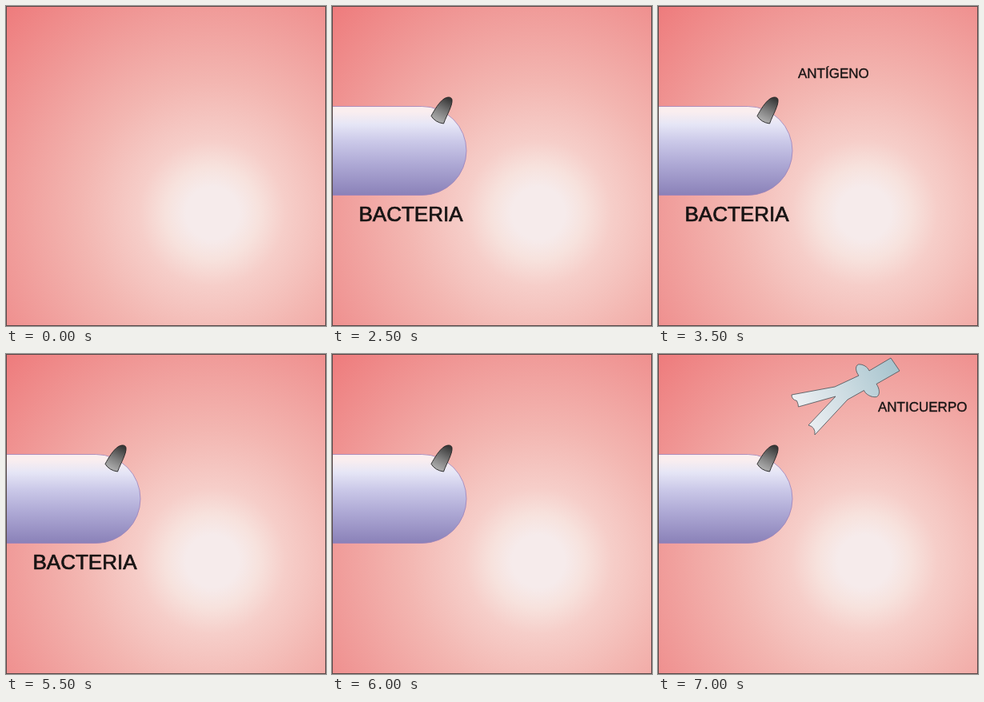
Animation, 400 px wide and 400 px high, one loop 8000 ms. Source, as an HTML page:

```html
<!DOCTYPE html>
<html lang="es">
<head>
<meta charset="utf-8">
<title>Bacteria, antígeno y anticuerpo</title>
<style>
  html, body { margin: 0; width: 100%; height: 100%; overflow: hidden; }
  svg { display: block; width: 100vw; height: 100vh; }
  text {
    font: 17px "Liberation Sans", Arial, sans-serif;
    fill: #181414; stroke: #181414; stroke-width: .35;
  }
  .big { font-size: 26px; stroke-width: .7; }

  /* every part appears and disappears with a hard cut */
  .part { opacity: 0; animation: 8s step-end infinite; }
  #bacteria { animation-name: bacteria; }
  #bacteria-label { animation-name: bacteria-label; }
  #antigen-label { animation-name: antigen-label; }
  #arrow { animation-name: arrow; }
  #antibody { animation-name: antibody; }
  #antibody-label { animation-name: antibody-label; }

  @keyframes bacteria { 0% { opacity: 0 } 18.75%, 100% { opacity: 1 } }
  @keyframes bacteria-label { 0%, 75%, 100% { opacity: 0 } 31.25% { opacity: 1 } }
  @keyframes antigen-label { 0%, 68.75%, 100% { opacity: 0 } 43.75% { opacity: 1 } }
  @keyframes arrow { 0%, 68.75%, 100% { opacity: 0 } 50% { opacity: 1 } }
  @keyframes antibody { 0% { opacity: 0 } 81.25%, 100% { opacity: 1 } }
  @keyframes antibody-label { 0% { opacity: 0 } 87.5%, 100% { opacity: 1 } }
</style>
</head>
<body>
<svg viewBox="0 0 400 400">
  <defs>
    <radialGradient id="tissue" gradientUnits="userSpaceOnUse" cx="258" cy="259" r="365">
      <stop offset=".09" stop-color="#f6ebeb"/>
      <stop offset=".16" stop-color="#f7e2dd"/>
      <stop offset=".25" stop-color="#f6cec9"/>
      <stop offset=".45" stop-color="#f3b6b1"/>
      <stop offset=".71" stop-color="#f09a98"/>
      <stop offset="1" stop-color="#ee7b7c"/>
    </radialGradient>
    <linearGradient id="cell" x2="0" y2="1">
      <stop offset=".06" stop-color="#faeeef"/>
      <stop offset=".2" stop-color="#e6e6f6"/>
      <stop offset=".4" stop-color="#cac8e8"/>
      <stop offset=".65" stop-color="#aea9d5"/>
      <stop offset="1" stop-color="#8a81b8"/>
    </linearGradient>
    <linearGradient id="spike" gradientUnits="userSpaceOnUse" x1="148" y1="114" x2="131" y2="146">
      <stop offset=".08" stop-color="#383838"/>
      <stop offset=".55" stop-color="#7c7c7c"/>
      <stop offset="1" stop-color="#b4b4b4"/>
    </linearGradient>
    <linearGradient id="protein" gradientUnits="userSpaceOnUse" x1="172" y1="76" x2="300" y2="14">
      <stop offset=".05" stop-color="#eceff2"/>
      <stop offset=".5" stop-color="#cbdbe1"/>
      <stop offset="1" stop-color="#a6c3cd"/>
    </linearGradient>
  </defs>

  <rect width="400" height="400" fill="url(#tissue)"/>

  <g id="bacteria" class="part">
    <path d="M0 125.5H112.5A55.5 55.5 0 0 1 112.5 236.5H0Z"
          fill="url(#cell)" stroke="#9c82ba" stroke-width=".8"/>
    <path d="M124 137.500C128 130 134 120 140 116C145 113 149 113.500 150 117C151 124 144 135 139.500 147Q129 145.500 124 137.500Z"
          fill="url(#spike)" stroke="#222" stroke-width=".9"/>
  </g>

  <text id="bacteria-label" class="part big" x="33.500" y="269">BACTERIA</text>
  <text id="antigen-label" class="part" x="175" y="90">ANTÍGENO</text>

  <path id="arrow" class="part" fill="#8c6b62"
        d="M162 118L173.900 105.200L175.700 109.300L207 95.800L209.200 100.800L177.800 114.200L179.500 118.200Z"/>

  <path id="antibody" class="part" fill="url(#protein)" stroke="#555d62" stroke-width=".9"
        d="M291 5L302 21L273 37.500C277 43 278 51 273.500 53.500C267 55 259 50 257.500 45.500L237 57L196 101Q197 91 188 89L222 53L175.500 66Q175.500 63 173.500 58.500Q167 57 167 51L221 41L251 27C247 22 246 15 250.500 13C256 12.500 262 16 264 21Z"/>
  <text id="antibody-label" class="part" x="275" y="72">ANTICUERPO</text>

  <rect x=".5" y=".5" width="399" height="399" fill="none" stroke="#574848"/>
</svg>
</body>
</html>
```
